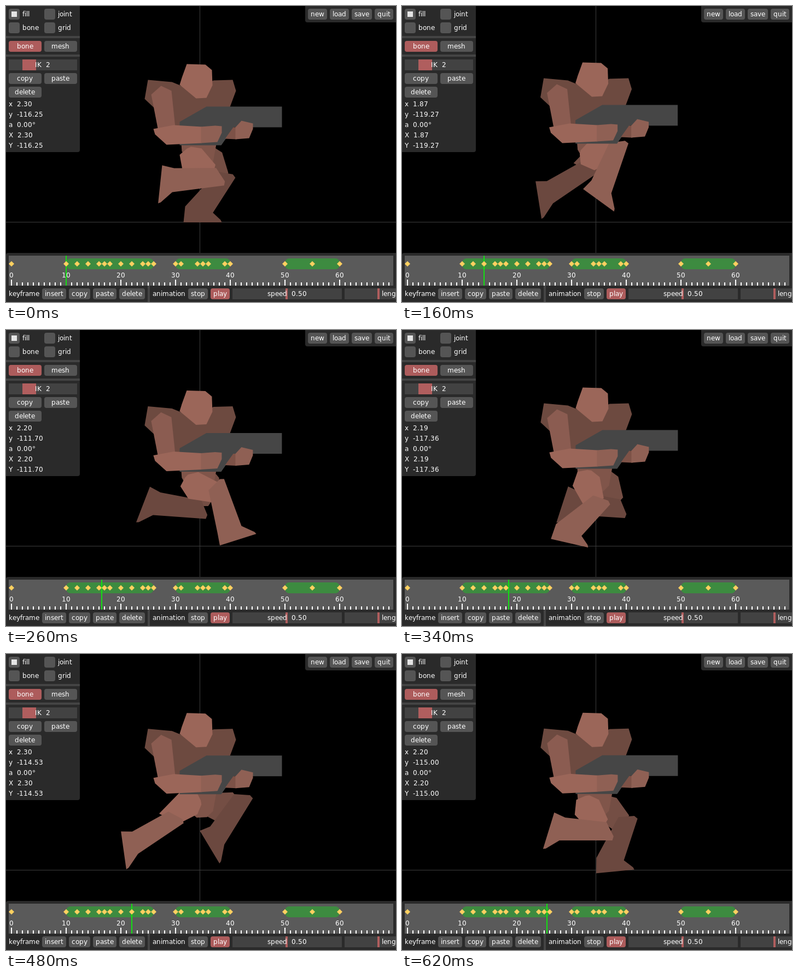
An HTML page with a canvas that plays this animation: 713 by 543 pixels, repeating every 640 ms.

```html
<!DOCTYPE html>
<html>
<head>
<meta charset="utf-8">
<style>
html, body { margin: 0; height: 100%; overflow: hidden; background: #000; }
canvas { display: block; }
</style>
</head>
<body>
<canvas id="stage" width="713" height="543"></canvas>
<script>
const ctx = document.getElementById('stage').getContext('2d');
const PANEL = '#2a2a2a', BUTTON = '#555', TRACK = '#424242', RED = '#ad5c5c', RULE = '#444';
const FIRST = 10, CYCLE = 16;
const HIP = [341, 273.3], SHIN = 75, LEG_GAP = 34;

// Timeline position, body x, body y.
const bodyKeys = [
  [10, 2.3, -116.25], [12, 2.73, -120.13], [14, 1.87, -119.27], [16, 2.2, -110.4],
  [17, 2.2, -113], [20, 2.18, -121.72], [22, 2.3, -114.53], [24, 2.2, -109.5], [25, 2.1, -113.75]
];
// Timeline position, ankle x, ankle y, foot angle in degrees; both legs share this gait.
const gait = [
  [10, 305, 316, 96], [12, 331, 323, 98], [14, 362, 333, 36], [16, 438, 355, -24],
  [17.5, 338, 376.5, -5], [18, 312, 374, 0], [20, 257, 346, 52], [22, 235, 342, 82],
  [24, 242, 310, 112], [25.5, 293, 316.5, 107]
];

const wrap = pos => FIRST + ((pos - FIRST) % CYCLE + CYCLE) % CYCLE;

function sample(keys, pos) {
  const i = keys.findLastIndex(k => k[0] <= pos);
  const a = keys[i], b = keys[(i + 1) % keys.length];
  const p = (pos - a[0]) / ((b[0] - a[0] + CYCLE) % CYCLE);
  return a.slice(1).map((v, n) => v + (b[n + 1] - v) * p);
}

function poly(color, ...points) {
  ctx.fillStyle = color;
  ctx.beginPath();
  points.forEach(([x, y]) => ctx.lineTo(x, y));
  ctx.fill();
}

function place([x, y], angle, ...points) {
  const c = Math.cos(angle), s = Math.sin(angle);
  return points.map(([u, v]) => [x + u * c - v * s, y + u * s + v * c]);
}

// Two-bone inverse kinematics: the knee follows from hip and ankle.
function drawLeg(phase, thighColor, shinColor) {
  const [ax, ay, degrees] = sample(gait, phase);
  const thigh = 49.5 - 4 * Math.cos((phase - 17.8) * Math.PI / 8);
  const dx = ax - HIP[0], dy = ay - HIP[1], reach = Math.hypot(dx, dy);
  const bend = (thigh ** 2 + reach ** 2 - SHIN ** 2) / (2 * thigh * reach);
  const thighAngle = Math.atan2(dy, dx) - Math.acos(Math.min(1, bend));
  const [knee] = place(HIP, thighAngle, [thigh, 0]);
  const shinAngle = Math.atan2(ay - knee[1], ax - knee[0]);
  const footAngle = degrees * Math.PI / 180;
  const flex = ((shinAngle + 2 * Math.PI) % (2 * Math.PI) - footAngle - 1.4) / 0.87;
  poly(thighColor, ...place(HIP, thighAngle,
    [-18, 16], [-16, -2], [-13, -9], [3, -20], [42, -16], [61, 19], [4, 32]));
  poly(shinColor,
    ...place(knee, shinAngle, [-5, 13], [-19, -12.5], [-17, -20]),
    ...place([ax, ay], footAngle, [25 + 7 * flex, -1 + 6 * flex], [46, 18], [48, 22.5],
      [-22, 22.5], [-19, -7 * flex]));
}

function drawFigure(pos, x, y) {
  const lag = 1.4 * Math.exp(-(((pos - 19.5) / 3.15) ** 2));
  ctx.save();
  ctx.translate(x - 1.8, y + 116.75);
  ctx.translate(LEG_GAP, 0);
  drawLeg(wrap(pos + CYCLE / 2 - lag), '#744e44', '#6b483f');
  ctx.translate(-LEG_GAP, 0);
  // torso and waist
  poly('#6d4a40', [259, 135], [303, 139], [330, 150], [360, 145], [379, 136], [414, 135],
    [420, 155], [407, 190], [385, 254], [320, 254], [309, 222], [270, 186], [253, 170]);
  poly('#80554a', [320, 253], [384, 253], [378, 286], [367, 297], [348, 298], [330, 282], [321, 266]);
  drawLeg(pos, '#9b6659', '#8f6054');
  // gun and the hand that supports it
  poly('#464646', [366, 184], [504, 184], [504, 222], [416, 222], [393, 255], [317, 255], [317, 212]);
  poly('#7d5247', [415, 222], [421, 222], [421, 244], [400, 243]);
  poly('#8f6054', [430, 210], [451, 215], [451, 225], [444, 242], [419, 244], [419, 222]);
  // near arm and head
  poly('#8b5c51', [283, 146], [302, 155], [309, 222], [277, 224], [265, 162]);
  poly('#9b6659', [269, 225], [306, 218], [357, 221], [357, 251], [293, 254], [272, 235]);
  poly('#8f6054', [356, 221], [382, 219], [394, 220], [394, 232], [386, 249], [356, 251]);
  poly('#9b6659', [330, 106], [364, 107], [376, 117], [377, 145], [366, 168], [347, 169],
    [317, 144], [321, 131]);
  ctx.restore();
}

function box(color, x, y, w, h, radius = 0) {
  ctx.fillStyle = color;
  ctx.beginPath();
  ctx.roundRect(x, y, w, h, radius);
  ctx.fill();
}

// Text is set on whole-pixel advances.
const advance = char => Math.round(ctx.measureText(char).width);
const textWidth = str => [...str].reduce((sum, char) => sum + advance(char), 0);

function text(str, x, y) {
  ctx.fillStyle = '#fff';
  for (const char of str) {
    ctx.fillText(char, x, y);
    x += advance(char);
  }
}

const centered = (str, x, y) => text(str, Math.floor(x - textWidth(str) / 2), y);

function button(label, x, y, w, color = BUTTON) {
  box(color, x, y, w, 20, 4);
  centered(label, x + w / 2, y + 14);
}

function buttonRow(labels, x, y, active) {
  for (const label of labels) {
    const w = textWidth(label) + 10;
    button(label, x, y, w, label === active ? RED : BUTTON);
    x += w + 5;
  }
}

function checkbox(label, x, y, on) {
  box(BUTTON, x, y, 20, 20, 4);
  if (on) box('#e4e4e4', x + 5, y + 5, 10, 10);
  text(label, x + 25, y + 14);
}

function slider(label, x, y, w, handleX, handleW, labelX) {
  box(TRACK, x, y, w, 20);
  box('#b05e5e', handleX, y, handleW, 20);
  text(label, labelX, y + 14);
}

function drawSidePanel(x, y) {
  box(PANEL, 0, 0, 135, 268, [0, 0, 4, 0]);
  ['fill', 'joint', 'bone', 'grid'].forEach((label, i) =>
    checkbox(label, 5 + i % 2 * 65, 5 + (i >> 1) * 25, i === 0));
  box(RULE, 0, 55, 135, 4);
  button('bone', 5, 64, 60, RED);
  button('mesh', 70, 64, 60);
  box(RULE, 0, 89, 135, 4);
  slider('IK  2', 5, 98, 125, 30, 25, 53);
  ['copy', 'paste', 'delete'].forEach((label, i) =>
    button(label, 5 + i % 2 * 65, 123 + (i >> 1) * 25, 60));
  const sx = x.toFixed(2), sy = y.toFixed(2);
  ['x  ' + sx, 'y  ' + sy, 'a  0.00°', 'X  ' + sx, 'Y  ' + sy]
    .forEach((line, i) => text(line, 5, 184 + 19 * i));
}

function drawTopPanel() {
  box(PANEL, 547, 0, 166, 30, [0, 0, 0, 4]);
  buttonRow(['new', 'load', 'save', 'quit'], 552, 5);
}

function drawTimeline(pos) {
  const at = k => 10 + k * 10;
  box(PANEL, 0, 453, 713, 90, [4, 0, 0, 0]);
  box('#5a5a5a', 5, 458, 703, 55);
  for (const [from, to] of [[10, 26], [30, 40], [50, 60]])
    box('#3d8b40', at(from), 463, at(to) - at(from), 20, 8);
  for (let k = 0; k < 70; k++) {
    const h = k % 10 ? 6 : 11;
    box('#fff', at(k) - 1, 513 - h, 2, h);
  }
  for (let k = 0; k <= 60; k += 10) centered(String(k), at(k), 498);
  box('#12e012', at(pos) - 1, 458, 2, 55);
  for (const k of [0, 10, 12, 14, 16, 17, 18, 20, 22, 24, 25, 26, 30, 31, 34, 35, 36, 39, 40, 50, 55, 60])
    poly('#ffd060', [at(k) - 5, 473], [at(k), 468], [at(k) + 5, 473], [at(k), 478]);
}

function drawControls() {
  text('keyframe', 5, 532);
  buttonRow(['insert', 'copy', 'paste', 'delete'], 66, 518);
  box(RULE, 259, 513, 4, 30);
  text('animation', 268, 532);
  buttonRow(['stop', 'play'], 333, 518, 'play');
  slider('speed  0.50', 414, 518, 200, 511, 4, 478);
  slider('length', 619, 518, 200, 679, 4, 687);
}

function render(now) {
  const pos = FIRST + Math.floor(now / 20) / 2 % CYCLE;
  const [x, y] = sample(bodyKeys, pos);
  ctx.font = '12px "DejaVu Sans", sans-serif';
  box('#000', 0, 0, 713, 543);
  box('#3c3c3c', 354, 0, 1, 543);
  box('#3c3c3c', 0, 396, 713, 1);
  drawFigure(pos, x, y);
  drawSidePanel(x, y);
  drawTopPanel();
  drawTimeline(pos);
  drawControls();
}

const start = performance.now();
function tick() {
  render(performance.now() - start);
  requestAnimationFrame(tick);
}
tick();
</script>
</body>
</html>
```
